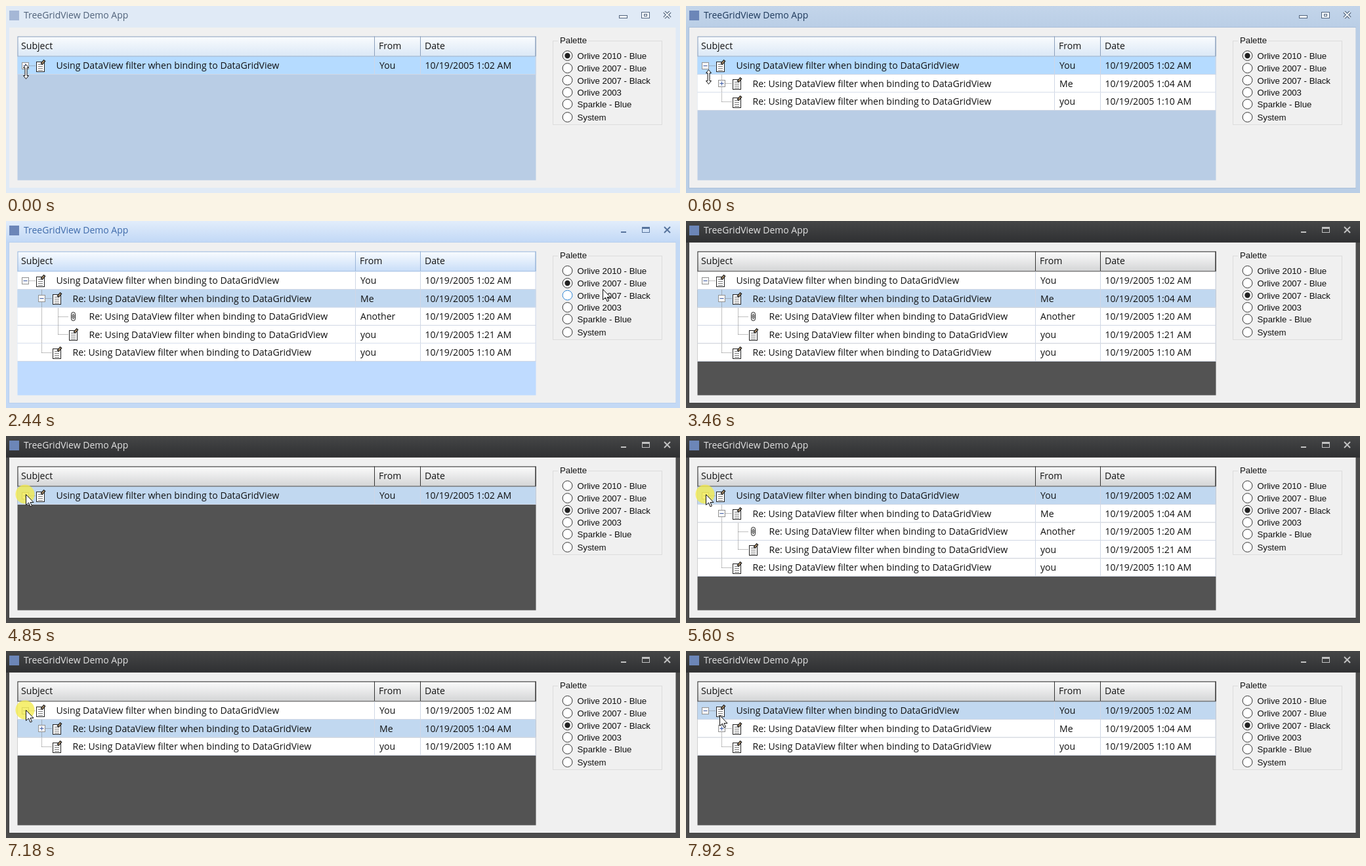
These frames come from a looping animation (1027x286 px, 7990 ms). An HTML page with a canvas:

```html
<!DOCTYPE html>
<html lang="en">
<head>
<meta charset="utf-8">
<title>TreeGridView Demo App</title>
<style>
  html, body { margin: 0; height: 100%; overflow: hidden; }
  canvas { display: block; }
</style>
</head>
<body>
<canvas id="stage" width="1027" height="286"></canvas>
<script>
const ctx = document.getElementById('stage').getContext('2d');
const LOOP = 7990;
const UI = '"Open Sans", "Noto Sans", sans-serif';
const CLASSIC = '"Liberation Sans", Arial, sans-serif';

const themes = {
  light: { title: ['#c3d5ea', '#bacee6'], frame: '#bacee6', edge: '#a9bfd9', caption: '#1e395b', button: '#53657d',
           head: ['#fafcfe', '#dbe8f6'], headLine: '#8ba0bc', back: '#b9cde5', select: '#b5dbff', outlined: true },
  blue:  { title: ['#e2edfb', '#c1d8f6'], frame: '#c3d9f5', edge: '#b8cfee', caption: '#3e6aaa', button: '#56739c',
           head: ['#fafcff', '#c9def8'], headLine: '#9ab5d8', back: '#bfdbff', select: '#c1d8f0' },
  black: { title: ['#454647', '#2f3032'], frame: '#4c4c4c', edge: '#424242', caption: '#e3e3e3', button: '#c3c3c3',
           head: ['#fcfcfc', '#d4d5d6'], headLine: '#333', back: '#535353', select: '#c1d8f0' }
};
const palettes = ['Orlive 2010 - Blue', 'Orlive 2007 - Blue', 'Orlive 2007 - Black', 'Orlive 2003', 'Sparkle - Blue', 'System'];
const themeOrder = ['light', 'blue', 'black'];
const radioY = [76, 95, 113.5, 132, 150, 170];

const grid = { left: 17.5, top: 46.5, width: 790, height: 220, row: 27.5 };
const subject = 'Using DataView filter when binding to DataGridView';
const messages = [
  { level: 0, from: 'You', time: '1:02', toggle: 'root' },
  { level: 1, from: 'Me', time: '1:04', toggle: 'reply' },
  { level: 2, from: 'Another', time: '1:20', clip: true },
  { level: 2, from: 'you', time: '1:21', last: true },
  { level: 1, from: 'you', time: '1:10', last: true }
];

// Each event merges its changes into the state once its time is reached.
const click = (press, act, release, change) =>
  [[press, { pressed: true }], [act, change], [release, { pressed: false }]];
const events = [
  [0, { active: false, root: false, reply: false, selected: 0, palette: 0, pressed: false, resize: true, hidden: false }],
  [60, { resize: false }],
  [200, { active: true }],
  ...click(200, 330, 460, { root: true }),
  [540, { resize: true }], [670, { resize: false }],
  ...click(1090, 1150, 1220, { reply: true, selected: 1 }),
  ...click(2240, 2340, 2440, { palette: 1 }),
  ...click(2920, 3050, 3180, { palette: 2 }),
  [3460, { hidden: true }], [3720, { hidden: false }],
  ...click(4600, 4720, 5000, { root: false, selected: 0 }),
  ...click(5470, 5600, 5740, { root: true }),
  ...click(6220, 6370, 6500, { reply: false, selected: 1 }),
  ...click(7180, 7310, 7310, { root: false, selected: 0 }),
  ...click(7780, 7850, 7920, { root: true })
];

// Pointer path: time, x, y
const path = [
  [0, 30, 100], [60, 30, 100], [200, 30, 90], [500, 30, 90], [600, 34, 108], [800, 55, 117],
  [1420, 55, 117], [1700, 430, 121], [1950, 895, 88], [2040, 909, 96],
  [2360, 909, 96], [2440, 909, 104], [2520, 909, 104], [2590, 909, 112],
  [3180, 909, 112], [3460, 110, 130], [3719, 110, 130], [3720, 87, 122], [4180, 15, 96], [4460, 30, 89],
  [5740, 30, 89], [6160, 55, 122], [6500, 55, 122], [7110, 30, 90], [7850, 30, 90], [7920, 51, 98]
];

function stateAt(t) {
  return Object.assign({}, ...events.filter(e => e[0] <= t).map(e => e[1]));
}

function pointerAt(t) {
  const next = path.findIndex(p => p[0] > t);
  if (next < 0) return path[path.length - 1].slice(1);
  const [t0, x0, y0] = path[next - 1], [t1, x1, y1] = path[next];
  const k = (t - t0) / (t1 - t0);
  return [Math.round(x0 + (x1 - x0) * k), Math.round(y0 + (y1 - y0) * k)];
}

function box(x, y, w, h, fill, stroke) {
  if (fill) { ctx.fillStyle = fill; ctx.fillRect(x, y, w, h); }
  if (stroke) { ctx.strokeStyle = stroke; ctx.strokeRect(x + .5, y + .5, w - 1, h - 1); }
}

function text(s, x, y, color = '#111', font = '14.1px ' + UI) {
  ctx.font = font;
  ctx.fillStyle = color;
  ctx.fillText(s, x, y);
}

function line(points, color, width = 1) {
  ctx.beginPath();
  points.forEach(p => ctx.lineTo(...p));
  ctx.strokeStyle = color;
  ctx.lineWidth = width;
  ctx.stroke();
  ctx.lineWidth = 1;
}

function gradient(y, h, [top, bottom]) {
  const g = ctx.createLinearGradient(0, y, 0, y + h);
  g.addColorStop(0, top);
  g.addColorStop(1, bottom);
  return g;
}

function shape(points, fill, stroke) {
  ctx.beginPath();
  points.forEach(p => ctx.lineTo(...p));
  ctx.closePath();
  ctx.fillStyle = fill;
  ctx.fill();
  ctx.strokeStyle = stroke;
  ctx.stroke();
}

function disc(x, y, r, fill, stroke) {
  ctx.beginPath();
  ctx.arc(x, y, r, 0, 2 * Math.PI);
  ctx.fillStyle = fill;
  ctx.fill();
  if (stroke) { ctx.strokeStyle = stroke; ctx.stroke(); }
}

function drawWindow(theme, active) {
  box(0, 0, 1027, 286, active ? theme.frame : '#e0eaf6');
  if (active) {
    box(0, 0, 1027, 33, gradient(0, 33, theme.title));
    box(4, 32, 1017, 247, null, theme.edge);
  }
  box(5, 33, 1015.5, 245, '#f0f0f0');
  ctx.globalAlpha = active ? 1 : .5;
  box(5, 7, 15, 15, '#6c86b8');
  ctx.globalAlpha = 1;
  text('TreeGridView Demo App', 27, 19, active ? theme.caption : '#50627a', '14px ' + UI);

  const c = theme.button;
  const cross = (color, width) => {
    line([[1003, 9], [1012, 18]], color, width);
    line([[1012, 9], [1003, 18]], color, width);
  };
  if (theme.outlined) {
    box(934, 14, 13, 5, '#f4f8fc', c);
    box(968, 9, 13, 10, '#f4f8fc', c);
    box(972, 12, 5, 4, null, c);
    cross(c, 4.5);
    cross('#f4f8fc', 2);
  } else {
    box(937, 16, 8, 2, c);
    box(969, 9, 12, 9, null, c);
    box(969, 9, 12, 3, c);
    cross(c, 2);
  }
}

function drawNote(x, y) {
  box(x - 7, y - 6, 13, 16, '#fff', '#222');
  for (let i = 0; i < 4; i++) box(x - 4, y - 2 + i * 3, 7, 1, '#777');
  line([[x + 1, y - 2], [x + 6, y - 8]], '#222', 4);
  line([[x + 2, y - 3], [x + 5, y - 7]], '#c9a476', 1.4);
}

function drawClip(x, y) {
  ctx.beginPath();
  ctx.roundRect(x - 3.5, y - 6.5, 6, 13, 3);
  ctx.roundRect(x - 1.5, y - 3.5, 2, 7, 1);
  ctx.strokeStyle = '#111';
  ctx.stroke();
}

function drawTree(row, y, open) {
  const x = 29.5 + row.level * 25;
  const stem = row.level === 2 ? 79.5 : x;
  ctx.setLineDash([1, 1]);
  line([[stem, y], [x + 16, y]], '#808080');
  if (row.level) {
    line([[stem, y - 13], [stem, row.last ? y : y + 14]], '#808080');
    if (row.level === 2) line([[54.5, y - 13], [54.5, y + 14]], '#808080');
  }
  ctx.setLineDash([]);
  if (row.toggle) {
    box(x - 5.5, y - 5.5, 11, 11, '#f8f8f8', '#929292');
    line([[x - 3, y], [x + 3, y]], '#3d5ba5');
    if (!open) line([[x, y - 3], [x, y + 3]], '#3d5ba5');
  }
}

function drawGrid(theme, state) {
  const { left, top, width, height, row: rowHeight } = grid;
  const visible = messages.filter(m => !m.level || state.root && (m.level < 2 || state.reply));
  const fromX = state.root && state.reply ? 533 : 562;
  const columns = [fromX - 1, 631, left + width - 1];
  const headBottom = top + 30;

  box(left, top, width, height, theme.back);
  box(left, top, width, 31, gradient(top, 30, theme.head), theme.headLine);
  columns.forEach(x => box(x, top, 1, 30, theme.headLine));
  text('Subject', 23, 66);
  text('From', fromX + 6, 66);
  text('Date', 638, 66);

  visible.forEach((row, i) => {
    const rowTop = headBottom + 1 + i * rowHeight;
    const y = Math.floor(91 + i * 27.6) + .5;
    const baseline = Math.round(96 + i * 27.6);
    box(left, rowTop, width, rowHeight, messages.indexOf(row) === state.selected ? theme.select : '#fff');
    box(left, rowTop + rowHeight - 1, width, 1, '#d0d7e5');
    columns.forEach(x => box(x, rowTop, 1, rowHeight, '#d0d7e5'));
    drawTree(row, y, state[row.toggle]);
    const iconX = 53 + row.level * 25;
    (row.clip ? drawClip : drawNote)(iconX, y - .5);
    text((row.level ? 'Re: ' : '') + subject, 76.5 + row.level * 25, baseline);
    text(row.from, fromX + 7, baseline);
    text(`10/19/2005 ${row.time} AM`, 638.5, baseline);
  });
}

function drawPalette(state, [px, py]) {
  const font = '13.2px ' + CLASSIC;
  box(833, 53, 167, 129, null, '#dcdcdc');
  box(841, 50, 46, 8, '#f0f0f0');
  text('Palette', 844, 57, '#111', font);
  palettes.forEach((name, i) => {
    const y = radioY[i];
    const hover = !state.hidden && px > 845 && px < 990 && py - y >= -9.5 && py - y < 9;
    disc(855.5, y, 7.4, '#fff', hover ? '#2f86d6' : '#333');
    if (i === state.palette) disc(855.5, y, 4.2, '#222');
    text(name, 870.5, y + 5, '#111', font);
  });
}

function drawPointer(state, [x, y]) {
  if (state.hidden) return;
  if (state.pressed) disc(x - 1, y, 14.5, 'rgba(244, 234, 76, .78)');
  ctx.save();
  ctx.translate(x + .5, y + .5);
  if (state.resize) {
    const half = [[0, -11], [4, -6], [1.5, -6], [1.5, 6], [4, 6], [0, 11]];
    shape([...half, ...half.slice(1, -1).reverse().map(([a, b]) => [-a, b])], '#fff', '#111');
  } else {
    shape([[0, 0], [0, 16], [4, 12.5], [6.5, 18.5], [9, 17.5], [6.5, 12], [11.5, 12]], '#fff', '#111');
  }
  ctx.restore();
}

function render(now) {
  const t = now % LOOP;
  const state = stateAt(t), pointer = pointerAt(t);
  const theme = themes[themeOrder[state.palette]];
  drawWindow(theme, state.active);
  drawGrid(theme, state);
  drawPalette(state, pointer);
  drawPointer(state, pointer);
  requestAnimationFrame(() => render(performance.now() - start));
}

const start = performance.now();
render(0);
</script>
</body>
</html>
```
